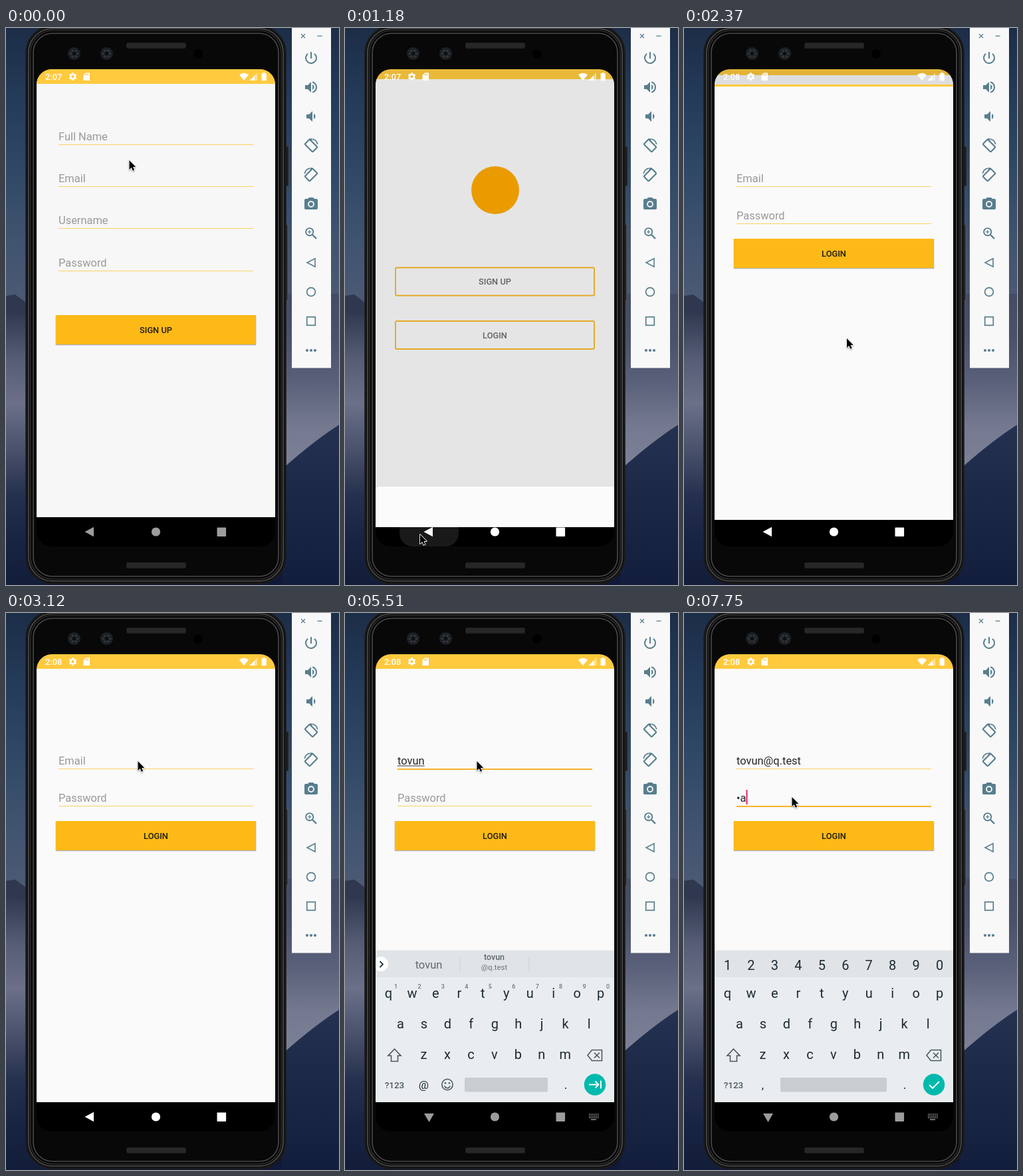
An HTML page with a canvas that plays this animation: 501x838 px, repeating every 8000 ms.

```html
<!DOCTYPE html>
<html lang="en">
<head>
<meta charset="utf-8">
<title>Sign in demo</title>
<style>
html, body { margin: 0; width: 100%; height: 100%; overflow: hidden; background: #10193a; }
canvas { display: block; width: 501px; height: 838px; }
</style>
</head>
<body>
<canvas id="stage" width="501" height="838"></canvas>
<script>
const ctx = document.getElementById('stage').getContext('2d');
const LOOP = 8000;
const USER = 'tovun', DOMAIN = '@q.test', EMAIL = USER + DOMAIN;
const AMBER = '#fdb916', BAR = '#ffca3e', PAGE = '#fafafa', INK = '#1d2b33', TEAL = '#587e8e', KEY = '#4b585f';

// The screen only updates in bursts: [first, last, count].
const BURSTS = [[150, 1180, 8], [1330, 1920, 5], [2220, 3120, 7], [3410, 3710, 3], [4160, 4160, 1],
  [4610, 5060, 4], [5510, 5510, 1], [5810, 6850, 8], [7000, 7150, 2], [7600, 7750, 2]];
const STEPS = [0];
for (const [a, b, n] of BURSTS)
  for (let i = 0; i < n; i++) STEPS.push(Math.round((a + (b - a) * i / Math.max(1, n - 1)) / 10) * 10);
const KEY_TIMES = [4610, 4760, 4910, 4910, 5060, 5810, 5960, 6110, 6260, 6400, 6550, 6700];

// Pointer moves: start, end, from, to.
const MOVES = [
  [0, 1030, 185.5, 199, 113, 762],
  [1180, 1920, 113, 762, 245, 467],
  [2370, 3120, 245, 467, 198.5, 223],
  [6700, 7000, 198.5, 223, 162.5, 277]
];

const clamp = v => Math.max(0, Math.min(1, v));
const smooth = v => v * v * (3 - 2 * v);
const settle = dt => dt <= 0 ? 0 : dt > 320 ? 1 : 1 - 2 ** (-dt / 40);

function rect(x, y, w, h, color) {
  ctx.fillStyle = color;
  ctx.fillRect(x, y, w, h);
}
function round(x, y, w, h, r, fill, stroke, width = 1) {
  ctx.beginPath();
  ctx.roundRect(x, y, w, h, r);
  paint(fill, stroke, width);
}
function paint(fill, stroke, width = 1) {
  if (fill) { ctx.fillStyle = fill; ctx.fill(); }
  if (stroke) { ctx.strokeStyle = stroke; ctx.lineWidth = width; ctx.stroke(); }
}
function disc(x, y, r, fill, stroke, width) {
  ctx.beginPath();
  ctx.arc(x, y, r, 0, Math.PI * 2);
  paint(fill, stroke, width);
}
function poly(pts, fill, stroke, width, open) {
  ctx.beginPath();
  for (let i = 0; i < pts.length; i += 2) ctx.lineTo(pts[i], pts[i + 1]);
  if (!open) ctx.closePath();
  paint(fill, stroke, width);
}
function line(pts, stroke, width) {
  poly(pts, null, stroke, width, true);
}
function text(s, x, y, size, color, align = 'left', weight = 400) {
  ctx.font = `${weight} ${size}px Roboto, sans-serif`;
  ctx.textAlign = align;
  ctx.fillStyle = color;
  ctx.fillText(s, x, y);
  return ctx.measureText(s).width;
}
function at(x, y, draw, angle = 0, scale = 1) {
  ctx.save();
  ctx.translate(x, y);
  ctx.rotate(angle);
  ctx.scale(scale, scale);
  draw();
  ctx.restore();
}
function clipRect(x, y, w, h, draw) {
  ctx.save();
  ctx.beginPath();
  ctx.rect(x, y, w, h);
  ctx.clip();
  draw();
  ctx.restore();
}
function vertical(y0, y1, ...colors) {
  const g = ctx.createLinearGradient(0, y0, 0, y1);
  colors.forEach((c, i) => g.addColorStop(i / (colors.length - 1), c));
  return g;
}

function desert() {
  rect(0, 0, 501, 420, vertical(0, 420, '#1c2d47', '#243b59', '#2f4865', '#3f536f', '#4d5a75'));
  poly([0, 403, 14, 401, 30, 413, 46, 440, 0, 446], '#30384f');
  poly([0, 428, 60, 438, 60, 838, 0, 838],
    vertical(428, 838, '#2f394f', '#555c74', '#6b7088', '#4a526c', '#26314f', '#182442', '#121d3a'));
  rect(418, 400, 83, 264, vertical(400, 664, '#434b65', '#4a526b', '#5a6079', '#747990', '#7d8197'));
  ctx.beginPath();
  ctx.moveTo(501, 597);
  ctx.quadraticCurveTo(462, 622, 415, 664);
  ctx.lineTo(415, 838);
  ctx.lineTo(501, 838);
  paint(vertical(597, 838, '#243150', '#1a2846', '#121e3b'));
}

function speaker(y) {
  round(181, y, 90, 9, 3, '#232323');
  for (let x = 183; x < 270; x += 3)
    for (let r = 2; r < 8; r += 3) rect(x, y + r, 1.4, 1.4, '#363636');
}
function lens(x) {
  disc(x, 38.5, 9.5, '#1d2125');
  for (let i = 0; i < 6; i++)
    disc(x + 5 * Math.cos(i * 1.05), 38.5 + 5 * Math.sin(i * 1.05), 1.5, '#353b41');
  disc(x, 38.5, 2.4, '#0b0d10');
}
function phone() {
  round(418, 178, 7, 60, 2, '#1c1c1e', '#3a3a3c');
  round(418, 295, 6, 115, 2, '#29292b', '#59595c');
  // Nested metal edges: inset, fill, highlight.
  const shell = [[0, '#141414', '#1c1c1c'], [4, '#0a0a0a', '#4e4e50'], [7, '#050505', '#2c2c2e'],
    [11, '#080808', '#4a4a4c']];
  for (const [d, fill, edge] of shell)
    round(30 + d, -3 + d, 391 - 2 * d, 839 - 2 * d, 40 - d, fill, edge, 1.6);
  speaker(22);
  speaker(804);
  lens(102.5);
  lens(151.5);
  disc(289, 39, 7, '#000');
}

function rotateIcon(y, side) {
  at(459, y, () => {
    ctx.scale(side, 1);
    at(0, 0, () => round(-5.2, -8.4, 10.4, 16.8, 1.2, null, TEAL, 2.1), -Math.PI / 4);
    ctx.beginPath();
    ctx.arc(0, 0, 10, -1.4, -.2);
    paint(null, TEAL, 1.6);
    poly([1, -11, -3, -10.5, 1.5, -6.5], TEAL);
  });
}
function speakerIcon(y, x) {
  poly([x - 9, y - 3, x - 5, y - 3, x, y - 8, x, y + 8, x - 5, y + 3, x - 9, y + 3], TEAL);
  ctx.beginPath();
  ctx.arc(x, y, 4.5, -1.1, 1.1);
  paint(TEAL);
}
function panel() {
  rect(430, 0, 59, 511, '#f8f8f8');
  rect(430, 511, 59, 1, '#a9abb5');
  line([444, 9, 450, 15], TEAL, 1.3);
  line([450, 9, 444, 15], TEAL, 1.3);
  rect(468.5, 11.4, 7, 1.3, TEAL);

  ctx.beginPath();
  ctx.arc(459, 45, 8, -.9, Math.PI + .9);
  paint(null, TEAL, 2);
  rect(458, 36, 2, 10, TEAL);

  speakerIcon(89, 459);
  ctx.beginPath();
  ctx.arc(459, 89, 8, -1.3, 1.3);
  paint(null, TEAL, 2);
  speakerIcon(133, 461);
  rotateIcon(177, 1);
  rotateIcon(221, -1);

  round(449, 257, 20, 16, 2, TEAL);
  poly([453, 258, 456, 255, 462, 255, 465, 258], TEAL);
  disc(459, 265, 4, null, '#f8f8f8', 1.8);

  disc(456.7, 306.7, 5.6, null, TEAL, 1.9);
  line([461, 311, 467, 317], TEAL, 2.4);
  rect(454, 306.2, 5.4, 1.2, TEAL);
  rect(456.1, 304, 1.2, 5.4, TEAL);

  poly([453, 353, 465, 346.8, 465, 359.2], null, TEAL, 1.6);
  disc(459, 397, 6.4, null, TEAL, 1.7);
  ctx.strokeRect(452.7, 434.7, 12.6, 12.6);
  for (let i = -1; i < 2; i++) disc(459 + i * 6, 485, 2.1, TEAL);
}

// An app window: status strip, page and navigation strip.
function appWindow(dy, bg, draw) {
  ctx.save();
  ctx.translate(0, dy);
  rect(46, 62, 359, 22, BAR);
  rect(46, 84, 359, 652, bg);
  rect(46, 736, 359, 70, '#000');
  draw();
  ctx.restore();
}
function field(hint, base, focused) {
  if (hint) text(hint, 79, base, 16.45, '#999');
  rect(79, base + 6, 293, focused ? 2 : 1, focused ? '#f6b32a' : '#fbd168');
}
function solidButton(label, y) {
  rect(74, y + 1, 303, 44, 'rgba(0,0,0,.1)');
  rect(75, y + 44, 301, 1.4, 'rgba(0,0,0,.22)');
  rect(75, y, 301, 44, AMBER);
  text(label, 225.5, y + 26.7, 12.8, '#1d1a12', 'center', 500);
}
function outlineButton(label, y, pressed) {
  round(76, y + 1, 299, 42, 2, pressed ? '#e2e2e2' : null, '#f9b928', 1.9);
  text(label, 225.5, y + 26.5, 12.8, '#6c6c6c', 'center', 500);
}
function signUpPage() {
  ['Full Name', 'Email', 'Username', 'Password'].forEach((s, i) => field(s, 169 + Math.round(i * 63.2), false));
  solidButton('SIGN UP', 432);
}
function homePage(t) {
  disc(226, 251, 36, '#ffaa00');
  outlineButton('SIGN UP', 366.5, false);
  outlineButton('LOGIN', 447, t >= 2220);
}
function caret(x, y) {
  rect(x, y, 2, 22, '#e0246c');
}
function loginPage(t) {
  const inPass = t >= 7000;
  const typed = EMAIL.slice(0, KEY_TIMES.filter(k => k <= t).length);
  const pass = t >= 7750 ? '•a' : t >= 7600 ? 'a' : '';
  field(typed ? '' : 'Email', 228, t >= 3410 && !inPass);
  field(pass ? '' : 'Password', 284, inPass);
  solidButton('LOGIN', 313);
  const w = text(typed, 79, 228, 16.45, '#262626');
  if (typed.length <= USER.length) rect(79, 229.5, w, 1, '#333');
  const pw = text(pass, 79, 284, 16.45, '#262626');
  if (inPass) caret(79 + pw, 266);
  else if (t >= 4160 && (t < 5510 || t >= 5810)) caret(79 + w, 211);
  if (t >= 3560) clipRect(46, 500, 359, 236, () => {
    ctx.translate(0, t < 3710 ? 110 : 0);
    keyboard(typed, inPass);
  });
}

function suggestions(typed) {
  disc(54, 528, 11, '#fff');
  line([52.5, 524, 57, 528.5, 52.5, 533], '#27343b', 1.8);
  if (!typed || typed.length > USER.length) return;
  text(typed, 126, 535, 16.5, '#5d686e', 'center');
  text(USER, 224.5, 522, 12.5, '#5d686e', 'center', 500);
  text(DOMAIN, 224.5, 537, 11.5, '#6c777c', 'center');
  rect(172.5, 518, 1, 21, '#cbd0d3');
  rect(276.5, 518, 1, 21, '#cbd0d3');
}
function keyboard(typed, numbers) {
  rect(46, 508, 359, 228, '#e9edf0');
  rect(46, 508, 359, 40, '#e0e4e7');
  rect(46, 507, 359, 1, '#eceeef');
  const row = (keys, x, y) => [...keys].forEach((k, i) => text(k, x + i * 35.45, y, 20, INK, 'center'));
  row('qwertyuiop', 65.5, 579);
  row('asdfghjkl', 83.5, 625);
  row('zxcvbnm', 118.5, 671);
  if (numbers) row('1234567890', 65.5, 537);
  else {
    [...'1234567890'].forEach((k, i) => text(k, 76.5 + i * 35.45, 565, 9, '#6b777d', 'center', 500));
    suggestions(typed);
  }

  poly([74.5, 656, 84, 666, 79.5, 666, 79.5, 674.5, 69.5, 674.5, 69.5, 666, 65, 666], null, KEY, 1.6);
  poly([365, 665.5, 371.5, 657.5, 386.5, 657.5, 386.5, 673.5, 371.5, 673.5], null, KEY, 1.6);
  line([375, 661.5, 383, 669.5], KEY, 1.6);
  line([383, 661.5, 375, 669.5], KEY, 1.6);

  text('?123', 74.5, 714.5, 13.5, KEY, 'center', 500);
  text(numbers ? ',' : '@', 118.5, 716, 17, INK, 'center');
  if (!numbers) {
    disc(154, 709.5, 8.2, null, KEY, 1.6);
    disc(151, 707.3, 1.3, KEY);
    disc(157, 707.3, 1.3, KEY);
    ctx.beginPath();
    ctx.arc(154, 710.5, 4.2, .2, Math.PI - .2);
    paint(null, KEY, 1.6);
  }
  const left = numbers ? 145 : 180;
  round(left, 699, 305 - left, 21.5, 2, '#c8cdd1');
  text('.', 332, 716, 18, INK, 'center');
  disc(376, 709.5, 16.2, '#00b9ad');
  if (numbers) line([369, 710, 374, 715, 384, 705], '#fff', 1.9);
  else {
    line([367, 709.5, 381, 709.5], '#fff', 1.9);
    line([376.5, 704.5, 381.5, 709.5, 376.5, 714.5], '#fff', 1.9);
    rect(384, 703.5, 1.9, 12, '#fff');
  }
}

function statusIcons(clock) {
  text(clock, 59, 78, 12.8, '#fff', 'left', 500);
  disc(100.5, 73.2, 3.4, null, '#fff', 2.6);
  for (let i = 0; i < 6; i++)
    at(100.5, 73.2, () => rect(-1.4, -5.8, 2.8, 2.5, '#fff'), i * Math.PI / 3);
  poly([120, 67.5, 126, 67.5, 126, 79, 116.5, 79, 116.5, 71], '#fff');
  for (let i = 0; i < 3; i++) rect(119.2 + i * 2, 69, 1, 2.4, '#e9bb46');
  ctx.beginPath();
  ctx.moveTo(358, 79);
  ctx.lineTo(351, 70.5);
  ctx.quadraticCurveTo(358, 65, 365, 70.5);
  paint('#fff');
  poly([378, 67.5, 378, 79, 366.5, 79], 'rgba(255,255,255,.45)');
  poly([374, 71.5, 374, 79, 366.5, 79], '#fff');
  rect(386.8, 67, 2.8, 2, '#fff');
  round(384.6, 68.2, 7.2, 11, 1, '#fff');
}
function navIcons(t) {
  const typing = t >= 3560;
  const c = t < 1030 || typing ? '#9c9c9c' : '#fff';
  if (typing) {
    poly([119, 753, 134, 753, 126.5, 766], c);
    for (let i = 0; i < 6; i++)
      for (let j = 0; j < 3; j++) rect(367 + i * 2.6, 753.5 + j * 2.6, 1.5, 1.5, c);
    rect(370, 761.5, 8, 1.4, c);
  } else poly([118.5, 758, 132, 750.8, 132, 765.2], c);
  disc(225.5, 758, 6.6, c);
  round(317.5, 751.5, 13.6, 13.6, 1, c);
}

function screen(t) {
  ctx.save();
  ctx.beginPath();
  ctx.roundRect(46, 62, 359, 718, 23);
  ctx.clip();
  const closing = settle(t - 1140), opening = settle(t - 2240);
  const drop = closing < 1 ? Math.ceil(29.4 * closing) : 0;
  if (opening < 1) {
    const away = closing < 1 ? 1 - closing : opening;
    appWindow(-Math.round(14.4 * away), PAGE, () => homePage(t));
    rect(46, 62, 359, 718, `rgba(0,0,0,${.12 * Math.sqrt(away)})`);
  }
  if (closing < 1) {
    const top = Math.round(62 + 718 * (1 - (1 - closing) ** 3));
    clipRect(46, top, 359, 780 - top, () =>
      appWindow(drop, closing > 0 ? '#fbfbfb' : '#f7f7f7', signUpPage));
  }
  if (opening > 0) {
    const top = Math.round(62 + 718 * (1 - opening) ** 1.53);
    clipRect(46, top, 359, 780 - top, () =>
      appWindow(Math.ceil(29.4 * (1 - opening)), PAGE, () => loginPage(t)));
  }
  statusIcons(t < 1770 ? '2:07' : '2:08');
  clipRect(46, 736 + drop, 359, 44 - drop, () => {
    if (t >= 1030 && t < 1480) round(82, 736, 89, 44, 20, t < 1330 ? '#191919' : '#0e0e0e');
    navIcons(t);
  });
  ctx.restore();
}

function pointer(t) {
  const [from, to, x0, y0, x1, y1] = MOVES.filter(m => t >= m[0]).pop();
  const p = smooth(clamp((t - from) / (to - from)));
  at(x0 + (x1 - x0) * p, y0 + (y1 - y0) * p, () => {
    ctx.lineJoin = 'round';
    const arrow = [0, 0, 0, 16, 3.7, 12.6, 6.1, 18.2, 8.8, 17, 6.4, 11.5, 11.3, 11.5];
    ctx.shadowColor = 'rgba(0,0,0,.3)';
    ctx.shadowBlur = 2;
    ctx.shadowOffsetY = 1;
    poly(arrow, '#000', '#fff', 2);
    ctx.shadowColor = 'transparent';
    poly(arrow, '#000');
  }, 0, .87);
}

const start = performance.now();
function frame(now) {
  const time = Math.max(0, now - start) % LOOP;
  const t = STEPS.filter(s => s <= time).pop();
  desert();
  phone();
  screen(t);
  panel();
  pointer(t);
  requestAnimationFrame(frame);
}
frame(start);
</script>
</body>
</html>
```
